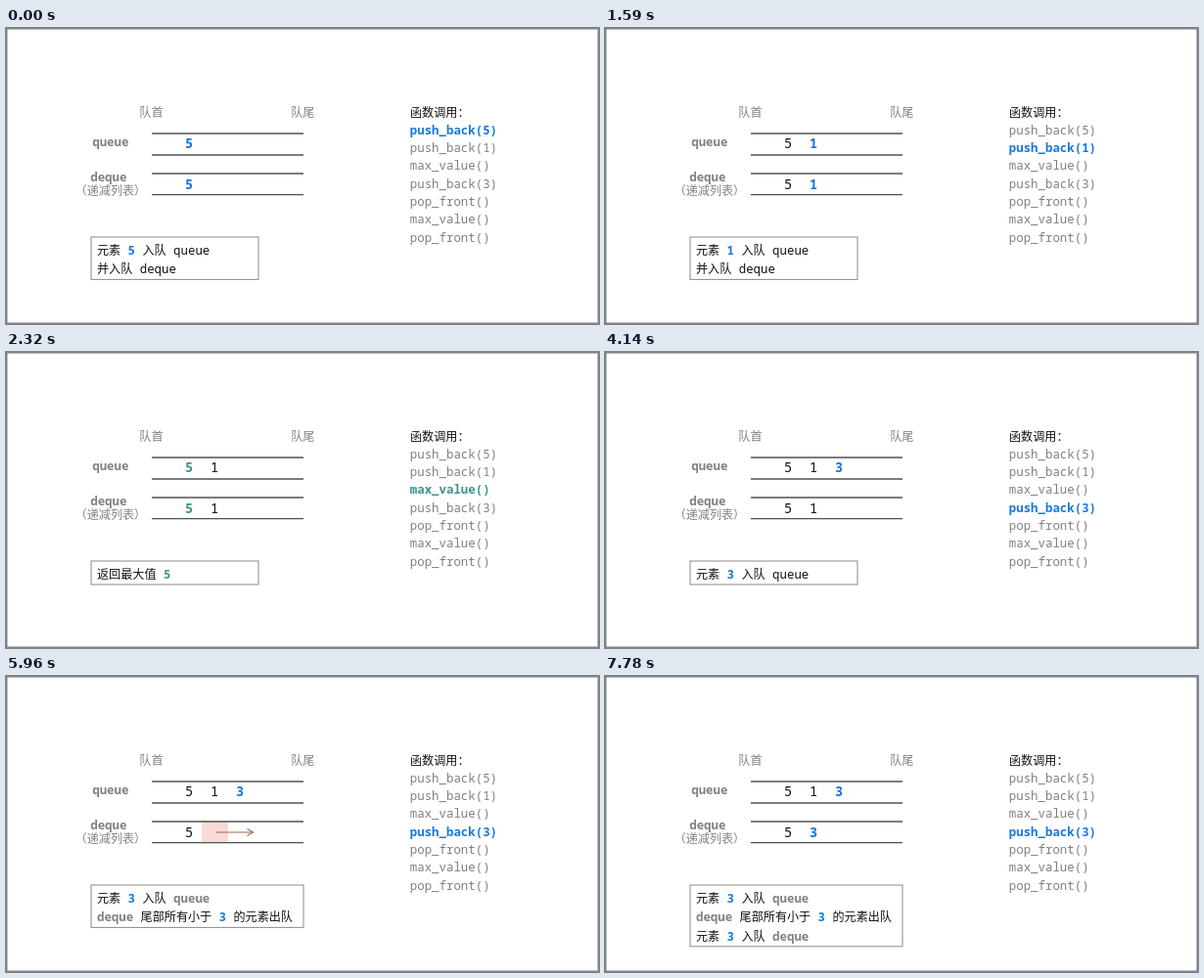
These frames come from a looping animation (606 by 303 pixels, 8000 ms). An HTML page with a canvas:

```html
<!DOCTYPE html>
<html lang="zh">
<head>
<meta charset="utf-8">
<title>Queue with maximum</title>
<style>
  html, body { margin: 0; width: 100%; height: 100%; overflow: hidden; background: #fff; }
  canvas { display: block; width: 606px; height: 303px; }
</style>
</head>
<body>
<canvas id="stage"></canvas>
<script>
const W = 606, H = 303, LOOP = 8000;
const MONO = '"Noto Sans Mono", "DejaVu Sans Mono", monospace';
const CJK = '"Noto Sans CJK SC", "Noto Sans CJK", sans-serif';
const BLUE = '#1679dc', GREEN = '#3d9589', GRAY = '#808080', BLACK = '#111';

const canvas = document.getElementById('stage');
const ctx = canvas.getContext('2d');
const dpr = window.devicePixelRatio || 1;
canvas.width = W * dpr;
canvas.height = H * dpr;
ctx.scale(dpr, dpr);

const calls = ['push_back(5)', 'push_back(1)', 'max_value()', 'push_back(3)',
               'pop_front()', 'max_value()', 'pop_front()'];

// In notes, *text* is accented and ~text~ is a muted name.
const steps = [
  { at: 0, call: 0, color: BLUE, queue: '*5', deque: '*5', width: 171,
    note: ['元素 *5* 入队 queue', '并入队 deque'] },
  { at: 500, call: 1, color: BLUE, queue: '5*1', deque: '5*1', width: 171,
    note: ['元素 *1* 入队 queue', '并入队 deque'] },
  { at: 2320, call: 2, color: GREEN, queue: '*51', deque: '*51', width: 171,
    note: ['返回最大值 *5*'] },
  { at: 4140, call: 3, color: BLUE, queue: '51*3', deque: '51', width: 171,
    note: ['元素 *3* 入队 queue'] },
  { at: 5960, call: 3, color: BLUE, queue: '51*3', deque: '5', width: 217, removing: true,
    note: ['元素 *3* 入队 ~queue~', '~deque~ 尾部所有小于 *3* 的元素出队'] },
  { at: 7780, call: 3, color: BLUE, queue: '51*3', deque: '5*3', width: 217,
    note: ['元素 *3* 入队 ~queue~', '~deque~ 尾部所有小于 *3* 的元素出队', '元素 *3* 入队 ~deque~'] }
];

function text(str, x, y, color, bold = false, size = 12.4) {
  ctx.fillStyle = color;
  for (const run of str.match(/[^\x00-\x7f]+|[\x00-\x7f]+/g)) {
    const wide = run.charCodeAt(0) > 127;
    const weight = bold ? 'bold ' : '';
    ctx.font = weight + (wide ? '12.1px ' + CJK : size + 'px ' + MONO);
    ctx.fillText(run, x, y);
    x += ctx.measureText(run).width;
  }
  return x;
}

function line(color, width, ...points) {
  ctx.strokeStyle = color;
  ctx.lineWidth = width;
  ctx.beginPath();
  points.forEach(([x, y]) => ctx.lineTo(x, y));
  ctx.stroke();
}

function richText(str, x, y, accent) {
  for (const part of str.match(/\*[^*]+\*|~[^~]+~|[^*~]+/g)) {
    const mark = part[0];
    if (mark === '*') x = text(part.slice(1, -1), x, y, accent, true);
    else if (mark === '~') x = text(part.slice(1, -1), x, y, GRAY, true);
    else x = text(part, x, y, BLACK);
  }
}

function track(items, top, bottom, baseline, accent) {
  for (const y of [top, bottom]) line('#505050', 1.3, [149, y], [304, y]);
  items.match(/\*?\d/g).forEach((item, i) => {
    const hot = item[0] === '*';
    text(item.slice(-1), 183.1 + i * 26, baseline, hot ? accent : BLACK, hot, 13.6);
  });
}

function removal() {
  const ink = '#a0665c';
  ctx.fillStyle = '#f9dbd6';
  ctx.fillRect(200, 149, 27, 21.5);
  line(ink, 1.1, [214, 160], [252, 160]);
  line(ink, 1.1, [246.5, 156.6], [252.5, 160], [246.5, 163.4]);
}

function draw(t) {
  const step = steps.filter(s => s.at <= t).pop();
  ctx.fillStyle = '#fff';
  ctx.fillRect(0, 0, W, H);
  ctx.strokeStyle = '#858585';
  ctx.lineWidth = 1.5;
  ctx.strokeRect(0.75, 0.75, W - 1.5, H - 1.5);

  text('队首', 136.3, 91.4, GRAY);
  text('队尾', 291.2, 91.4, GRAY);
  text('queue', 88.2, 121.3, GRAY, true);
  text('deque', 86.2, 157.3, GRAY, true);
  text('（递减列表）', 70.6, 171, GRAY);

  if (step.removing) removal();
  track(step.queue, 108, 130, 123.2, step.color);
  track(step.deque, 149, 170.6, 164.5, step.color);

  text('函数调用：', 413, 91.4, BLACK);
  calls.forEach((call, i) => {
    const active = i === step.call;
    text(call, 412.8, 108.7 + i * 18.35, active ? step.color : GRAY, active);
  });

  const rows = step.note.length;
  ctx.strokeStyle = '#8a8a8a';
  ctx.lineWidth = 1;
  ctx.strokeRect(87, 214, step.width, 4.6 + rows * 19.4);
  step.note.forEach((row, i) => richText(row, 93, 232.2 + i * 19.2, step.color));
}

let start;
function tick(now) {
  if (start === undefined) start = now;
  draw((now - start) % LOOP);
  requestAnimationFrame(tick);
}
draw(0);
requestAnimationFrame(tick);
</script>
</body>
</html>
```
